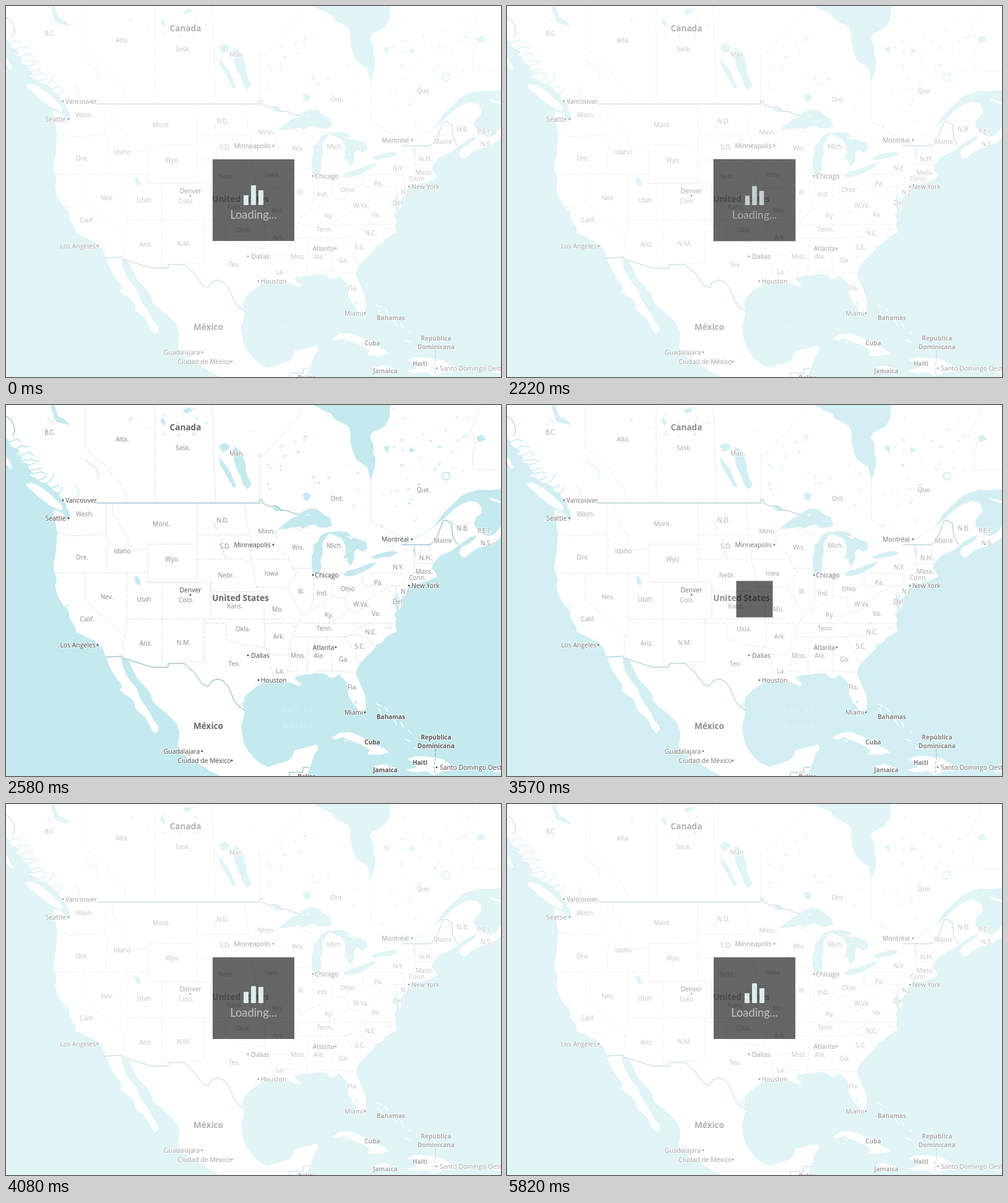
Recreate the animation shown at these times as an HTML page. Size 800x600 px, loop 6030 ms.

```html
<!DOCTYPE html>
<html lang="en">
<head>
<meta charset="utf-8">
<title>Map loading</title>
<style>
html, body { margin: 0; width: 100%; height: 100%; overflow: hidden; background: #fff; }
svg { display: block; width: 800px; height: 600px; font-family: "Open Sans", sans-serif; }
.water { fill: #c4e9ee; stroke: #c4e9ee; stroke-width: .5; }
.inlet { fill: none; stroke: #c4e9ee; stroke-linejoin: round; }
.land { fill: #fff; }
.islet { fill: none; stroke: #fff; stroke-width: 1.5; }
.state { fill: none; stroke: #d9d9d9; stroke-width: .8; stroke-dasharray: 7 1.5; }
.nation { fill: none; stroke: #74a9b7; }
.labels text { text-anchor: middle; paint-order: stroke; stroke: #fff; stroke-opacity: .8; stroke-width: 2px; stroke-linejoin: round; }
.states { fill: #888; font-size: 10.2px; }
.cities { fill: #444; font-size: 10.4px; }
.countries { fill: #666; font-weight: 700; font-size: 13.6px; }
.islands { fill: #555; font-weight: 700; font-size: 10px; }
.sea { fill: #d3eff3; font: italic 600 11px "Open Sans", sans-serif; letter-spacing: 2.6px; text-anchor: middle; }
.bars { fill: #dcecec; }
.loading { fill: #c2c2c2; font: 18.3px Lato, sans-serif; text-anchor: middle; }
</style>
</head>
<body>
<svg viewBox="0 0 800 600">
  <g class="water">
    <!-- Pacific -->
    <path d="M0 52L4 58 8 66 14 70 22 74 17 79 27 85 23 91 34 95 38 104 43 110 37 114 48 118 54 124 64 127 72 132 76 138 84 142 88 150 93 156 97 160 98 168 102 174 101 182 97 185 93 176 86 172 76 169 77 178 80 190 81 200 83 206 82 214 81 226 80 240 77 255 76 263 79 274H0Z"/>
    <path d="M0 272H79L82 282 79 292 83 308 90 320 94 326 101 332 103 345 112 360 113 368 124 372 134 378 141 380 148 386 155 392 160 404 161 408 166 420 172 432 179 443 186 451 187 458 183 461 192 468 202 474 208 482 208 489 213 496 224 504 230 514 236 526 242 532 236 600H0Z"/>
    <path d="M235 600L241 531 247 526 246 518 238 510 234 500 228 490 221 481 215 470 212 459 203 449 196 439 190 426 187 416 188 409 198 414 203 424 208 435 213 444 221 452 228 460 234 468 237 480 243 486 250 491 258 498 266 505 275 515 280 528 279 543 277 552 284 562 296 572 306 577 318 584 330 592 340 597 346 600Z"/>
    <!-- Gulf of Mexico and Caribbean -->
    <path d="M386 494L383 484 386 472 394 464 404 456 412 452 418 446 428 447 440 447 450 450 458 448 466 452 474 455 478 450 470 446 466 440 474 438 484 436 492 436 500 434 510 434 518 436 524 442 530 441 538 436 544 442 550 448 553 456 552 466 556 474 560 482 566 488 570 496 576 500H800V600H486L490 590 495 576 498 566 505 556 503 549 490 552 478 555 466 558 462 570 456 575 440 580 424 585 412 580 402 572 392 560 385 548 382 534 380 518 384 506Z"/>
    <!-- Atlantic -->
    <path d="M575 501L581 492 582 480 580 468 574 454 570 444 566 436 567 428 572 418 580 410 588 402 596 394 598 388 608 384 614 376 624 370 632 366 629 356 631 346 627 338 632 334 630 326 628 316 630 306 633 314 634 326 636 332 641 322 640 310 645 308 650 298 651 292 660 290 672 287 684 283 697 278 694 270 688 264 690 258 696 250 702 244 710 240 720 236 728 230 738 222 750 214 760 211 758 216 748 224 736 230 732 238 736 246 744 246 752 238 762 232 776 228 790 222 800 214V501Z"/>
    <path d="M690 198L698 188 706 176 716 166 727 156 736 147 748 142 764 137 782 138 800 136V196L790 208 780 212 770 208 762 202 756 192 760 182 769 174 768 165 762 157 750 155 736 160 722 170 710 182Z"/>
    <!-- Hudson Bay -->
    <path d="M497 0L512 8 526 14 530 22 542 28 553 34 557 44 557 60 561 76 566 88 576 95 584 100 587 112 589 121 593 110 596 98 597 88 593 78 594 66 588 52 592 44 602 40 612 34 620 20 620 8 622 0Z"/>
    <!-- Great Lakes -->
    <path d="M440 201L452 191 462 183 472 179 480 172 492 167 504 169 514 178 523 182 527 195 518 198 506 198 498 193 489 195 480 200 474 196 464 198 452 200ZM497 273L494 260 494 246 498 234 496 228 504 221 508 212 514 208 524 205 516 216 511 224 512 238 508 250 510 262 506 272 500 277ZM520 206L538 204 552 206 558 213 566 216 582 222 584 232 576 237 568 232 562 238 563 248 557 260 552 254 552 247 545 249 549 240 549 228 543 216 532 211Z"/>
    <path d="M546 273L553 268 562 266 574 262 586 257 599 254 594 260 584 266 572 272 560 276 548 277ZM590 246L602 241 614 238 626 236 633 239 622 245 608 246 598 249Z"/>
    <!-- Inland lakes -->
    <path d="M344 67L352 61 362 66 359 72 350 76ZM368 67L376 72 383 84 387 96 388 108 392 119 397 128 390 136 383 128 379 114 373 104 369 90ZM345 84L352 94 360 104 366 118 372 131 367 133 360 120 352 106 346 96ZM480 144L487 141 492 148 488 155 482 153ZM208 278L213 277 218 287 216 292 210 288ZM430 166L440 163 446 170 436 172ZM286 8L296 4 301 9 290 14ZM252 20L258 28 256 34 250 26ZM72 2L78 0 84 18 96 24 103 32 92 30 80 26ZM653 68L662 73 652 77ZM760 52L770 48 775 56 764 60ZM610 68L619 66 617 78ZM658 236L661 227 662 246ZM562 480L567 478 568 484Z"/>
  </g>
  <g class="inlet">
    <path stroke-width="2" d="M5 60L18 55 26 60M14 72L24 66 38 68M22 82L38 76 44 82M24 90L42 88 54 92M34 98L46 94M38 106L58 102M42 112L56 108 66 112M52 122L66 116M64 128L74 120 78 110M74 134L86 130M84 144L91 138 90 132M100 168L103 182 99 188"/>
    <path stroke-width="1.3" d="M112 130L118 140 116 150M128 88L136 96 146 102 150 118M66 20L78 30M348 216L354 228 350 240 358 248M336 190L340 202M94 326L104 324M632 302L636 318M620 320L630 324M614 360L624 360M376 492L382 480"/>
    <circle cx="711" cy="115" r="6" stroke-width="2"/>
    <path d="M711 120V126M689 198L674 208 656 220 640 226"/>
  </g>
  <g class="water" id="ponds"></g>
  <g class="land">
    <path d="M32 127L42 126 52 130 62 137 72 145 80 153 88 160 92 167 88 171 80 167 70 162 60 154 52 148 44 140 36 134ZM0 84L4 88 11 102 7 104 0 94ZM526 538L540 530 555 529 572 535 588 544 600 551 612 556 619 562 602 566 584 565 588 558 578 551 566 546 553 541 545 537 533 541ZM648 573L662 568 676 568 690 570 704 572 716 580 730 587 722 592 706 592 692 599 680 592 662 594 646 590 664 586 660 578ZM594 584L610 581 630 587 616 592ZM762 203L772 206 785 203 778 208ZM780 150L800 155 799 159 784 154ZM548 211L562 214 558 217ZM486 178L492 176 488 180ZM189 437L194 445 190 447ZM790 584H800V594H788Z"/>
    <path class="islet" d="M598 483L607 487M602 490L606 500 602 503M612 488L617 496M620 502L628 510 632 518M638 512L642 522M644 540L654 544M650 526L655 531M660 554L666 556M652 291L674 285 686 282M546 541L551 545"/>
  </g>
  <g class="state">
    <path d="M127 0V70L140 80 152 92 165 100 172 116 184 126 192 140 195 158M241 0V158M333 0L339 158M410 153V88L480 11M589 120V186L600 192 620 205 640 214 652 220M800 105H768L754 104V78L760 60 750 40 760 22 766 0M712 186L730 196 752 188"/>
    <path d="M82 206L104 212 115 211 161 209V158M161 209L166 222 162 238V272M79 272H229M172 158V178L180 186 188 204 194 208 198 226 206 236 218 234 229 232M229 225H309V287H229ZM309 158V225M195 272V346H450M229 287H252V346M252 287H331V346M127 272V315L195 378M195 346V362L190 380 189 388 192 400 187 406M252 346V423M320 346V416H284"/>
    <path d="M309 210H391M385 158L388 180 392 205 396 216 395 249M309 249H378L394 255M331 287V302H410M394 249L400 264 402 278 404 292 410 302 417 316V353M395 249H459M404 294H452L456 299M436 202L438 212 434 222 442 232 456 244 462 264 470 270 464 280 458 286 456 298 462 308 466 314 468 324 476 332 478 342M461 264H494M466 198L484 206 496 210 500 222M497 277V308L496 318 492 330M527 270V308M508 272H546"/>
    <path d="M472 353L478 342 486 336 494 330 504 326 512 322 520 314 528 308 536 312 548 312 554 302 562 296 572 290 577 280M577 268V292H640M586 272H638L646 280 640 288 645 296 640 304M417 353H464V359H470M320 353H355V378L370 384 384 388 400 390 417 392M417 353L419 372 417 392 424 396 426 404H456M426 404L428 424 432 436 430 446M472 353L466 370 460 384 456 404 460 418 454 430H470V438"/>
    <path d="M464 375H552L562 366 576 358 590 352M476 353H630M489 375L486 434M519 375L526 400 528 430M500 430H528L552 432H566M546 375L556 388 564 402 570 418M546 375L560 372 574 374 582 376 598 392M520 352L540 344 556 332 562 336 576 330 584 316 596 308 604 302 612 298 622 302 628 308M548 312L550 324 556 332M658 226L660 250V285M672 226L668 250M660 256H690M660 270H692M684 222L690 256M630 292V318"/>
  </g>
  <g class="nation">
    <path d="M146 158.5H410V153H414V158L426 164 436 163 444 170 456 171 466 176 474 177M640 226H686L694 218 698 210 706 188 712 186 716 190 720 192 722 212 726 220 730 226M0 18L8 24 13 34 14 44 10 50M160 408L187 406 188 409 236 424H262V418H288L296 426 303 431 310 441 318 452 327 455 333 446 342 443 351 446 359 455 364 466 368 477 375 486 386 494M458 600V594H480V586H490"/>
    <path stroke-dasharray="5 2" d="M694 556V574L691 584 694 598"/>
  </g>
  <text class="sea" x="471" y="496">Gulf of</text>
  <text class="sea" x="472" y="522">Mexico</text>
  <g class="labels" id="labels"></g>
  <rect id="veil" width="800" height="600" fill="#fff"/>
  <rect id="box" x="334" y="248" width="132" height="132" fill-opacity=".6"/>
  <g id="content">
    <g class="bars" id="bars">
      <rect x="384" width="8" rx="1"/><rect x="396" width="8" rx="1"/><rect x="408" width="8" rx="1"/>
    </g>
    <text class="loading" id="loading" x="400" y="344">Loading...</text>
  </g>
</svg>
<script>
const $ = id => document.getElementById(id);

// Each entry is "text,centre x,centre y"
const labels = {
  states: `B.C.,71,44|Alta.,188,55|Sask.,286,69|Man.,373,78|Ont.,535,151|Que.,675,137|Wash.,127,176|Ore.,123,246|Idaho,188,236|Mont.,251,192|N.D.,350,186|S.D.,354,228|Minn.,421,204|Wis.,472,230|Mich.,531,227|Wyo.,269,249|Nebr.,356,275|Iowa,429,272|Nev.,163,310|Utah,223,314|Colo.,291,315|Kans.,370,325|Mo.,439,330|Ill.,477,301|Ind.,511,304|Ohio,552,297|Pa.,602,287|N.Y.,634,262`,
  moreStates: `N.H.,678,247|Mass.,676,269|Conn.,665,279|N.J.,646,301|Del.,634,318|W.Va.,574,322|Va.,598,337|Ky.,522,339|Tenn.,515,361|N.C.,590,367|S.C.,572,390|Ga.,546,411|Ala.,506,405|Miss.,472,405|Ark.,441,374|Okla.,383,362|Tex.,369,418|La.,443,430|Fla.,560,456|N.M.,287,384|Ariz.,226,385|Calif.,131,346|Maine,706,219|N.B.,738,199|P.E.I.,773,203|N.S.,776,223`,
  cities: `Vancouver,121.5,154|Seattle,80,183|Minneapolis,398,226|Chicago,518.5,275|Denver,298,299|Los Angeles,116,388|Dallas,411,405|Houston,432.5,445|Atlanta,513,392|Miami,562,497|New York,678,292|Montréal,629,217|Guadalajara,284,560|Ciudad de México,320.5,575|Santo Domingo Oeste,754,586`,
  countries: `Canada,290,36|United States,379,312|México,327,519`,
  islands: `Bahamas,622,504|Cuba,592,545|República,695,537|Dominicana,695,551|Haiti,669,578|Jamaica,613,590|Belize,486,601`
};
const dots = "92,154 101,183 432,226 496,275 298,307 148,388 391,405 408,445 533,392 580,497 651,292 656,217 317,560 365,575 696,586";

$("labels").innerHTML = Object.entries(labels).map(([kind, list]) =>
  `<g class="${kind === "moreStates" ? "states" : kind}">` + list.split("|").map(entry => {
    const [text, x, y] = entry.split(",");
    return `<text x="${x}" y="${+y + (kind === "countries" ? 5 : 4)}">${text}</text>`;
  }).join("") + "</g>"
).join("") + dots.split(" ").map(dot => {
  const [x, y] = dot.split(",");
  return `<circle cx="${x}" cy="${y}" r="1.4" fill="#444"/>`;
}).join("");

// Small lakes scattered over northern Canada
let seed = 11;
const random = () => (seed = seed * 16807 % 2147483647) / 2147483647;
const scatter = (count, x, y, width, height) => Array.from({ length: count }, () => {
  const px = x + random() * width, py = y + random() * height;
  return `<ellipse cx="${px}" cy="${py}" rx="${1 + random() * 2}" ry="${.4 + random()}" transform="rotate(${-60 + random() * 70} ${px} ${py})"/>`;
}).join("");
$("ponds").innerHTML = scatter(14, 200, 5, 130, 45) + scatter(16, 400, 40, 90, 115)
  + scatter(10, 490, 75, 85, 90) + scatter(26, 625, 5, 130, 125) + scatter(10, 600, 135, 80, 65);

const LOOP = 6030, STEP = 30;
const patterns = [[16, 32, 24], [24, 16, 32], [32, 24, 16]];
const switches = [240, 990, 1740, 4020, 4770, 5520];

const progress = (t, start, end) => Math.min(1, Math.max(0, (t - start) / (end - start)));
const spring = u => .9 * u * (1 - u) ** 2 + 5.16 * u * u * (1 - u) + u ** 3;
const backOut = u => 1 + 2.7 * (u - 1) ** 3 + 1.7 * (u - 1) ** 2;
const scaleAbout = (node, x, y, scale) =>
  node.setAttribute("transform", `translate(${x} ${y}) scale(${scale}) translate(${-x} ${-y})`);

function barHeights(t) {
  const index = switches.filter(start => t > start).length;
  if (!index) return patterns[0];
  const from = patterns[(index - 1) % 3], to = patterns[index % 3];
  const mix = spring(progress(t, switches[index - 1], switches[index - 1] + 300));
  return from.map((height, i) => height + (to[i] - height) * mix);
}

function render(time) {
  const t = Math.floor(time % LOOP / STEP) * STEP;
  const opening = t > 3000;
  const shown = (inStart, inEnd, outStart, outEnd) =>
    opening ? progress(t, inStart, inEnd) : 1 - progress(t, outStart, outEnd);

  $("veil").setAttribute("opacity", .5 * shown(3480, 3660, 2410, 2580));
  scaleAbout($("box"), 400, 314, Math.max(0, backOut(shown(3540, 3810, 2204, 2474))));

  const content = shown(3720, 3870, 2190, 2340);
  $("content").setAttribute("opacity", content);
  scaleAbout($("bars"), 400, 322, .8 + .2 * content);
  scaleAbout($("loading"), 400, 338, .8 + .2 * content);

  const heights = barHeights(t);
  [...$("bars").children].forEach((bar, i) => {
    bar.setAttribute("y", 322 - heights[i]);
    bar.setAttribute("height", heights[i]);
  });
}

const start = performance.now();
(function tick() {
  render(performance.now() - start);
  requestAnimationFrame(tick);
})();
</script>
</body>
</html>
```
